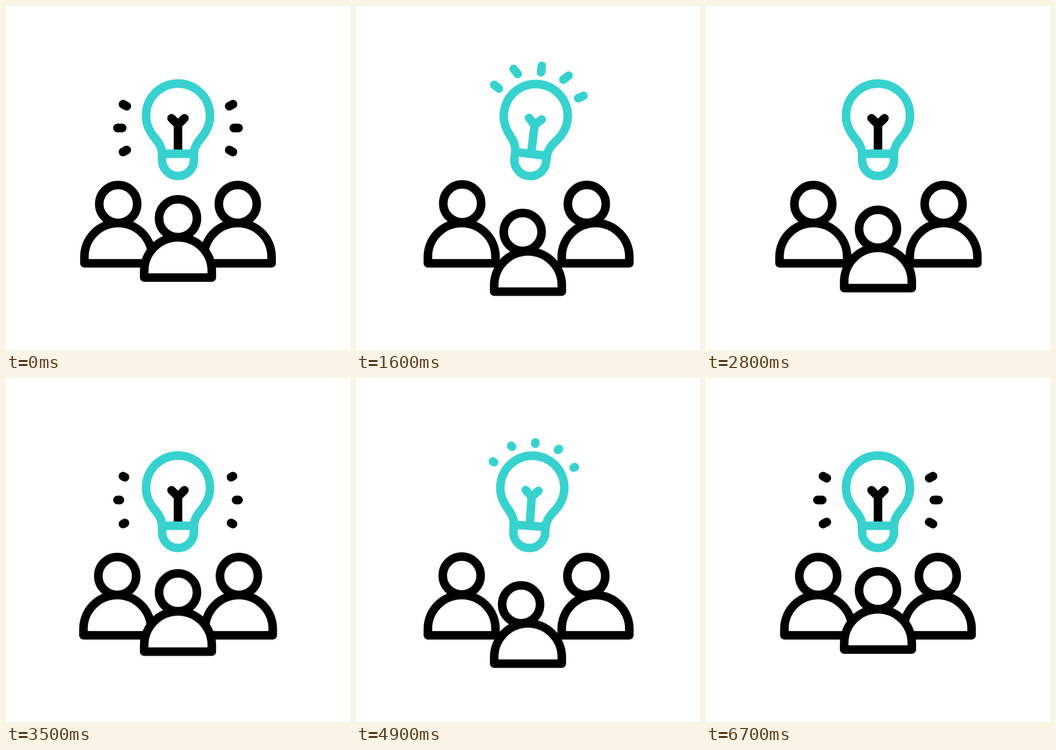
An HTML page for the animation above (6.8 s loop, 748 by 748 pixels).

```html
<!DOCTYPE html>
<html lang="en">
<head>
<meta charset="utf-8">
<title>Team idea</title>
<style>
  :root { --teal: #37d2cf; --sine: cubic-bezier(.37, 0, .63, 1); }
  html, body { margin: 0; width: 100%; height: 100%; overflow: hidden; background: #fff; }
  svg { display: block; width: 100vw; height: 100vh; }
  svg * { stroke-linecap: round; stroke-linejoin: round; }
  .person { fill: #fff; stroke: #000; stroke-width: 18.6px; }
  .bulb { fill: none; stroke: var(--teal); stroke-width: 18.6px; transform-origin: 374px 376px; }
  .side { fill: none; stroke: #000; stroke-width: 19px; }

  .person, .head, .bulb, .rays path, .side path {
    animation: 3.4s var(--sine) infinite;
  }

  /* The group opens up and closes again */
  .left { animation-name: open; --to: -14.2px, 0px; }
  .right { animation-name: open; --to: 16.8px, 0px; }
  .mid { animation-name: open; --to: 0px, 30.6px; }
  @keyframes open {
    0%, 90.2%, 100% { transform: translate(0px, 0px); }
    11.76%, 78.43% { transform: translate(var(--to)); }
  }

  /* Heads turn from one side to the other */
  .left .head { animation-name: headLeft; }
  .mid .head { animation-name: headMid; }
  .right .head { animation-name: headRight; }
  @keyframes headLeft {
    0%, 34%, 78%, 100% { transform: translate(0px, 0px); }
    44.2% { transform: translate(0px, -1px); animation-timing-function: ease-in; }
    54% { transform: translate(9px, -4px); animation-timing-function: ease-out; }
    63%, 67% { transform: translate(17px, 1px); }
  }
  @keyframes headMid {
    0%, 14.7%, 78%, 100% { transform: translate(0px, 0px); }
    28%, 44.2% { transform: translate(-15px, 0px); }
    44.2% { animation-timing-function: ease-in; }
    54% { transform: translate(2px, -4px); animation-timing-function: ease-out; }
    63%, 67% { transform: translate(20px, 1px); }
  }
  @keyframes headRight {
    0%, 14.7%, 78%, 100% { transform: translate(0px, 0px); }
    28%, 44.2% { transform: translate(-20px, 0px); }
    64%, 67% { transform: translate(0px, -4px); }
  }

  .bulb { animation-name: swing; }
  @keyframes swing {
    0% { transform: rotate(0deg); }
    12.26% { transform: rotate(0deg); animation-timing-function: cubic-bezier(.61, 1, .88, 1); }
    19.6%, 49% { transform: rotate(7.6deg); }
    34.3% { transform: rotate(-7.6deg); }
    63.7% { transform: rotate(-7.6deg); animation-timing-function: cubic-bezier(.12, 0, .39, 0); }
    71.1%, 100% { transform: rotate(0deg); }
  }

  .filament { animation: lit 3.4s step-end infinite; }
  @keyframes lit {
    0%, 61% { stroke: #000; }
    19.6% { stroke: var(--teal); }
  }

  /* Rays are drawn from their first point */
  .rays path, .side path { stroke-dasharray: 1 9; }
  .rays path { animation-name: pulse; }
  @keyframes pulse {
    0%, 22.7%, 34.03%, 45.03%, 56.65%, 68.26%, 79.85%, 100% { stroke-dashoffset: 1; }
    16.9%, 28.5%, 39.5%, 50.82%, 62.44%, 74.06% { stroke-dashoffset: 0; }
  }
  .rays { animation: glow 3.4s step-end infinite; }
  @keyframes glow {
    0%, 79.8% { opacity: 0; }
    20% { opacity: 1; }
  }
  .side path { animation-name: shrink; animation-timing-function: linear; }
  @keyframes shrink {
    0%, 96.1%, 100% { stroke-dashoffset: 0; }
    5.88%, 90.2% { stroke-dashoffset: 1; }
  }
  .side { animation: hide 3.4s step-end infinite; }
  @keyframes hide {
    0%, 90.3% { opacity: 1; }
    5.8% { opacity: 0; }
  }
</style>
</head>
<body>
<svg viewBox="0 0 748 748">
  <defs>
    <circle id="head" cy="430.5" r="41.2"/>
    <path id="body" d="M-73.5 559.5V545.5A73.5 73.5 0 0 1 73.5 545.5V559.5Z"/>
    <g id="sideRays">
      <path pathLength="1" d="M254.5 213.5L262.5 217.8"/>
      <path pathLength="1" d="M242.5 265.3H252.5"/>
      <path pathLength="1" d="M254.5 317.5L262.5 313.2"/>
    </g>
  </defs>

  <g class="side">
    <path pathLength="1" d="M254.5 213.5L262.5 217.8"/>
    <path pathLength="1" d="M242.5 265.3H252.5"/>
    <path pathLength="1" d="M254.5 317.5L262.5 313.2"/>
    <g transform="matrix(-1 0 0 1 748 0)">
      <path pathLength="1" d="M254.5 213.5L262.5 217.8"/>
      <path pathLength="1" d="M242.5 265.3H252.5"/>
      <path pathLength="1" d="M254.5 317.5L262.5 313.2"/>
    </g>
  </g>

  <g class="bulb">
    <g class="rays" transform="translate(374 376)">
      <path pathLength="1" d="M-86.8 -187.4L-125.8 -210.8"/>
      <path pathLength="1" d="M-50 -223.6L-86.2 -260.2"/>
      <path pathLength="1" d="M0 -233.5V-285"/>
      <path pathLength="1" d="M50 -223.6L86.2 -260.2"/>
      <path pathLength="1" d="M86.8 -187.4L125.8 -210.8"/>
    </g>
    <path class="filament" d="M360 244L374 258L388 244M374 258V314"/>
    <path d="M339.5 321C338 298 322 288 314 273.2A69.5 69.5 0 1 1 434 273.2C426 288 410 298 408.5 321"/>
    <path d="M339.4 321.3V335A34.6 34.6 0 0 0 408.6 335V321.3Z"/>
  </g>

  <g transform="translate(244 0)">
    <g class="person left"><use class="head" href="#head"/><use href="#body"/></g>
  </g>
  <g transform="translate(504 0)">
    <g class="person right"><use class="head" href="#head"/><use href="#body"/></g>
  </g>
  <g transform="translate(374 31)">
    <g class="person mid"><use class="head" href="#head"/><use href="#body"/></g>
  </g>
</svg>
</body>
</html>
```
